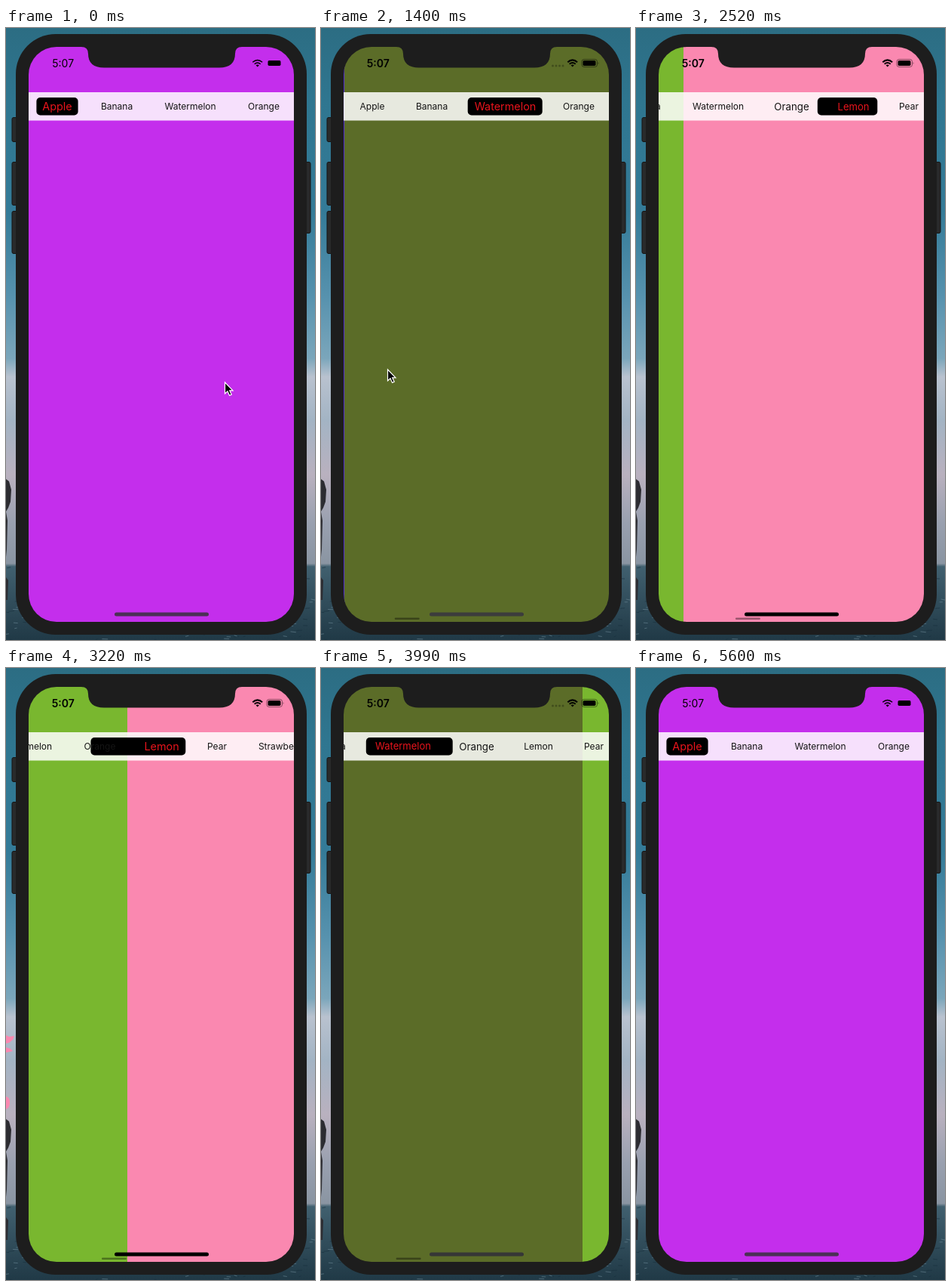
These frames come from a looping animation (410x810 px, 5670 ms). An HTML page:

```html
<!DOCTYPE html>
<html lang="en">
<head>
<meta charset="utf-8">
<title>Fruit pager</title>
<style>
  html, body { margin: 0; width: 100%; height: 100%; overflow: hidden; background: #2f7891; }
  svg { display: block; width: 410px; height: 810px; }
  text { font-family: Inter, Roboto, sans-serif; }
  .tab { font-size: 12px; text-anchor: middle; }
</style>
</head>
<body>
<svg viewBox="0 0 410 810">
  <defs>
    <linearGradient id="sky" x2="0" y2="1">
      <stop offset="0" stop-color="#2c6d83"/>
      <stop offset=".12" stop-color="#2f7690"/>
      <stop offset=".3" stop-color="#347b98"/>
      <stop offset=".44" stop-color="#5792ae"/>
      <stop offset=".54" stop-color="#7ba6bb"/>
      <stop offset=".57" stop-color="#b9c2cf"/>
      <stop offset=".64" stop-color="#a3b4c4"/>
      <stop offset=".73" stop-color="#b9b1bf"/>
      <stop offset=".81" stop-color="#99a0af"/>
      <stop offset=".875" stop-color="#8a95a2"/>
      <stop offset=".88" stop-color="#41606f"/>
      <stop offset="1" stop-color="#203946"/>
    </linearGradient>
    <clipPath id="screen"><rect x="30" y="25" width="352" height="761" rx="37"/></clipPath>
    <clipPath id="strip"><rect x="30" y="85" width="352" height="38"/></clipPath>
  </defs>

  <rect width="410" height="810" fill="url(#sky)"/>
  <g id="sea" stroke-linecap="round"></g>
  <path d="M0 597L4 600 7 611 6 627 3 635 0 640ZM0 640L2 652 1 690 0 700ZM0 727L3 731 2 757H0Z" fill="#2c2c31"/>
  <g id="smear" fill="#fa88b0">
    <path d="M0 486L4 488 11 487 9 492 4 496 0 497ZM0 502L6 504 9 507 0 509Z"/>
    <path d="M0 567Q5 568 5 575T0 584Z"/>
  </g>

  <g fill="#292a2b" stroke="#151515">
    <rect x="8" y="118.500" width="7" height="32" rx="2"/>
    <rect x="8" y="177.500" width="7" height="57" rx="2"/>
    <rect x="8" y="242.500" width="7" height="56" rx="2"/>
    <rect x="396" y="177.500" width="8" height="94" rx="2"/>
  </g>
  <rect x="13" y="8" width="386" height="795" rx="53" fill="#1d1d1d"/>

  <g clip-path="url(#screen)">
    <g id="pages"></g>
    <rect id="thumb" y="780.500" width="33" height="2.500" rx="1.200" fill="#000" fill-opacity=".38"/>
    <rect x="30" y="85" width="352" height="37.500" fill="#fff" fill-opacity=".85"/>
  </g>
  <g clip-path="url(#strip)">
    <rect id="pill" y="92" height="23.500" rx="5"/>
    <g id="tabs"></g>
  </g>
  <path d="M100 24V25Q109 25 109 34Q109 52.500 130 52.500H283Q304 52.500 304 34Q304 25 313 25V24Z" fill="#1d1d1d"/>

  <text id="clock" x="75.700" y="51.500" font-size="14" text-anchor="middle">5:07</text>
  <g id="dots" fill="#000" fill-opacity=".28">
    <circle cx="307.500" cy="50" r="1.500"/><circle cx="312" cy="50" r="1.500"/>
    <circle cx="316.500" cy="50" r="1.500"/><circle cx="321" cy="50" r="1.500"/>
  </g>
  <g id="wifi" fill="none" stroke="#000" stroke-width="2">
    <path d="M327.300 45.300Q333.700 39.500 340.100 45.300M329.700 47.700Q333.700 44.200 337.700 47.700"/>
    <path d="M331.600 49.300Q333.700 47.600 335.800 49.300L333.700 51.500Z" fill="#000" stroke="none"/>
  </g>
  <g id="shell">
    <rect x="346" y="41.500" width="20.500" height="10" rx="3" fill="none" stroke="#000" stroke-opacity=".45"/>
    <path d="M367.700 45Q369.500 46.500 367.700 48.200Z" fill-opacity=".5"/>
  </g>
  <rect x="347.500" y="43" width="17" height="7" rx="1.700"/>
  <rect id="home" x="144" y="773.500" width="125" height="5" rx="2.500"/>

  <g id="cursor">
    <g id="ring" fill="none">
      <circle cy="1" r="21.500" stroke="#fff" stroke-width="2.500" stroke-opacity=".85"/>
      <circle cy="1" r="21.500" stroke="#111" stroke-width="1.200"/>
    </g>
    <path d="M.5 0V15L4 11.800 6.600 17.400 9.200 16.200 6.700 10.800H11Z" fill="#000" stroke="#fff" stroke-width="1.200"/>
  </g>
</svg>

<script>
const LOOP = 5670, STEP = 70, WIDTH = 352, MID = 206.5;
const DRAG = 110, SETTLE = 460, CROSS = 122, GROW = 0.2;

// name, centre, width
const TABS = [
  ['Apple', 68, 32], ['Banana', 147, 42], ['Watermelon', 244.5, 68], ['Orange', 342, 42],
  ['Lemon', 424, 39], ['Pear', 497.5, 26], ['Strawberry', 584, 62]
];
const PAGES = ['#c42eec', '#522dcf', '#5b6c28', '#79b72f', '#fa88b0'];
const HOME = [[75, 48, 84], [84, 80, 98], [60, 60, 60], [0, 0, 0], [0, 0, 0]];

// start time, page before, page after
const SWIPES = [
  [320, 0, 1], [958, 1, 2], [1639, 2, 3], [2290, 3, 4],
  [3114, 4, 3], [3764, 3, 2], [4336, 2, 1], [4980, 1, 0]
];
// time, x, y
const POINTER = [
  [0, 290, 469], [300, 300, 470], [430, 40, 474], [560, 10, 478], [800, 110, 476], [920, 60, 472],
  [980, 0, 471], [1120, -60, 470], [1350, 60, 455], [1600, 200, 440], [1750, 75, 436], [1890, 65, 434],
  [2260, 230, 445], [2400, 20, 480], [2500, -60, 500], [3240, -60, 500], [3430, 440, 450],
  [3700, 120, 450], [3880, 380, 446], [3990, 440, 445], [4200, 150, 442], [4340, 130, 440],
  [4450, 330, 440], [4690, 220, 439], [4960, 90, 440], [5090, 380, 440], [5180, 440, 440], [5670, 440, 440]
];

const $ = id => document.getElementById(id);
const clamp = v => Math.max(0, Math.min(1, v));
const mix = (a, b, k) => a + (b - a) * k;
const ease = v => { v = clamp(v); return v * v * (3 - 2 * v); };
const show = (id, on) => $(id).setAttribute('visibility', on ? 'visible' : 'hidden');

function add(parent, tag, attrs) {
  const el = document.createElementNS('http://www.w3.org/2000/svg', tag);
  for (const key in attrs) el.setAttribute(key, attrs[key]);
  return parent.appendChild(el);
}

PAGES.forEach((fill, i) => add($('pages'), 'rect', { x: 30 + i * WIDTH, y: 25, width: WIDTH + 1, height: 761, fill }));
const labels = TABS.map(([name]) => {
  const el = add($('tabs'), 'text', { class: 'tab', y: 4.3 });
  el.textContent = name;
  return el;
});

let seed = 7;
const rand = () => (seed = seed * 16807 % 2147483647) / 2147483647;
for (let i = 0; i < 170; i++) {
  const x = rand() * 410, y = 714 + rand() * 96;
  add($('sea'), 'path', {
    d: `M${x} ${y}l${2 + rand() * 5} ${rand() * 2 - 1}`,
    stroke: rand() < 0.5 ? '#18303d' : '#6b8794', 'stroke-opacity': 0.6
  });
}

// Finger drag first, then a decaying glide to the next page.
function glide(age) {
  if (age <= 0) return 0;
  if (age < DRAG) return 0.4 * (age / DRAG) ** 2;
  return age > SETTLE ? 1 : 1 - 0.6 * Math.exp((DRAG - age) / 65);
}

const barOffset = i => Math.max(0, TABS[i][1] - MID);
const edge = (i, side) => TABS[i][1] + side * (TABS[i][2] * (1 + GROW) / 2 + 8.4);

function pointerAt(t) {
  let i = 1;
  while (POINTER[i][0] < t) i++;
  const a = POINTER[i - 1], b = POINTER[i], k = (t - a[0]) / (b[0] - a[0]);
  return [mix(a[1], b[1], k), mix(a[2], b[2], k)];
}

function draw(t) {
  let page = 0, bar = 0, selected = 0, thumb = 0, pressed = false;
  const grow = TABS.map((_, i) => i ? 0 : 1);
  for (const [start, from, to] of SWIPES) {
    const age = t - start;
    if (age > -25 && age < DRAG) pressed = true;
    if (age <= 0) continue;
    page = mix(from, to, glide(age));
    bar = mix(barOffset(from), barOffset(to), ease((age - SETTLE) / 250));
    thumb = 1 - clamp((age - SETTLE - 10) / 130);
    if (age >= CROSS) {
      const k = ease((age - CROSS) / 230);
      selected = to;
      grow[from] = 1 - k;
      grow[to] = k;
    }
  }

  $('pages').setAttribute('transform', `translate(${Math.round(-page * WIDTH)})`);
  $('thumb').setAttribute('x', 62 + 17.9 * page);
  $('thumb').setAttribute('opacity', thumb);

  // The leading edge stretches in the first half, the trailing one follows.
  const low = Math.floor(page), high = Math.min(low + 1, TABS.length - 1), part = page - low;
  const left = mix(edge(low, -1), edge(high, -1), clamp(part * 2 - 1)) - bar;
  const right = mix(edge(low, 1), edge(high, 1), clamp(part * 2)) - bar;
  $('pill').setAttribute('x', left);
  $('pill').setAttribute('width', right - left);
  labels.forEach((el, i) => {
    el.setAttribute('transform', `translate(${TABS[i][1] - bar} 103.8) scale(${1 + GROW * grow[i]})`);
    el.setAttribute('fill', i === selected ? '#e8141c' : '#141414');
  });

  const rest = page < 0.05;
  $('clock').setAttribute('font-weight', rest ? 400 : 600);
  $('wifi').setAttribute('stroke-width', rest ? 1.4 : 2);
  show('shell', !rest);
  show('dots', !rest && page < 3.05);
  show('smear', t >= 2900 && t < 3400);
  const near = Math.min(low + 1, HOME.length - 1);
  $('home').setAttribute('fill', `rgb(${HOME[low].map((v, i) => Math.round(mix(v, HOME[near][i], part)))})`);

  $('cursor').setAttribute('transform', `translate(${pointerAt(t)})`);
  show('ring', pressed);
}

const begin = performance.now();
function tick() {
  const t = (performance.now() - begin) % LOOP;
  draw(Math.floor(t / STEP) * STEP);
  requestAnimationFrame(tick);
}
tick();
</script>
</body>
</html>
```
